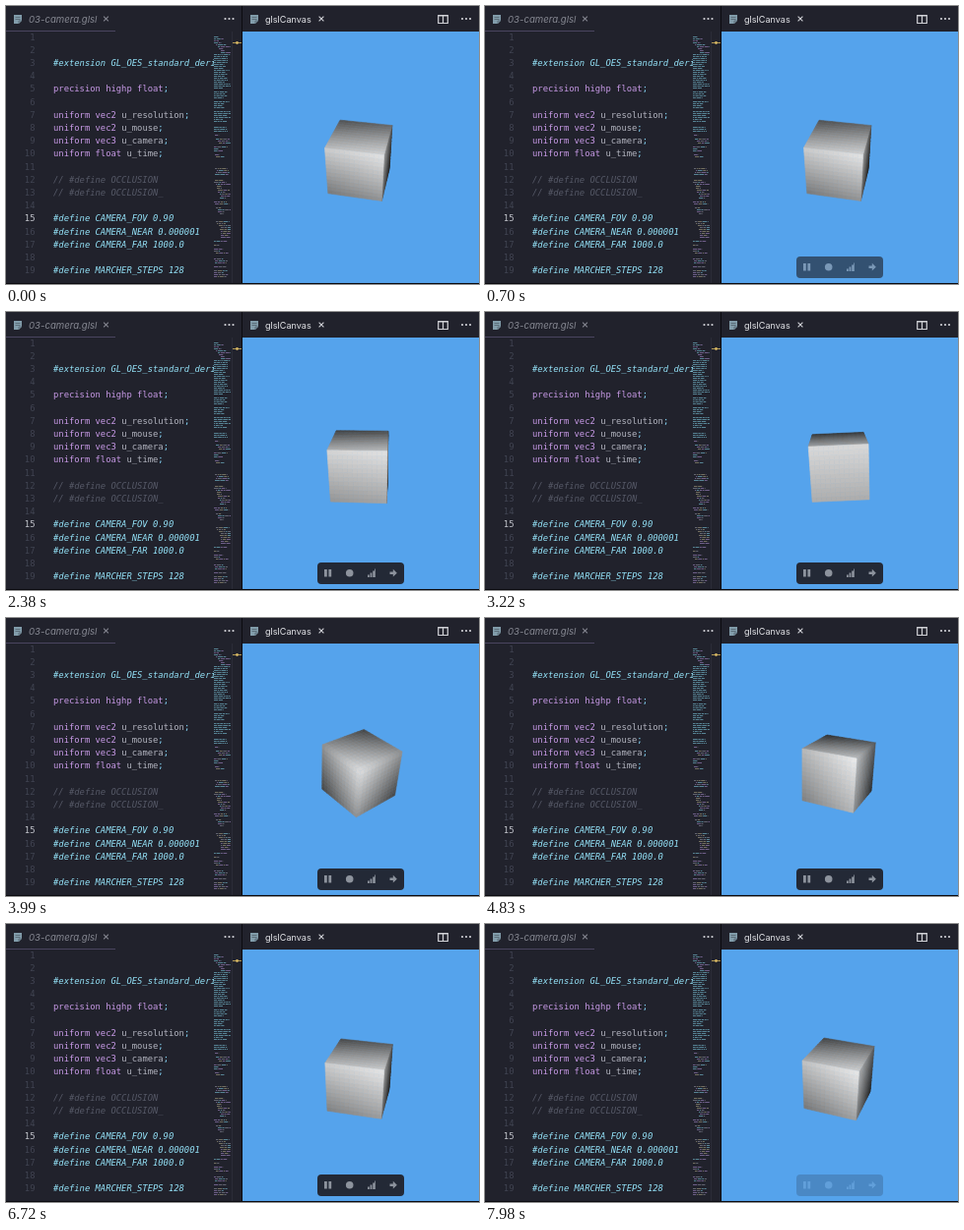
An HTML page with a canvas that plays this animation: 480 by 283 pixels, repeating every 8.05 s.

```html
<!DOCTYPE html>
<html lang="en">
<head>
<meta charset="utf-8">
<title>Shader preview</title>
<style>
html, body { margin: 0; width: 100%; height: 100%; overflow: hidden; background: #21222c; }
svg, canvas { position: absolute; left: 0; top: 0; }
text { white-space: pre; }
.tab { font-family: Inter, sans-serif; font-style: normal; }
#code text { font: 8.83px "DejaVu Sans Mono", monospace; fill: #b4b6c1; }
#code .macro { fill: #94e2f8; font-style: italic; }
#code .note { fill: #565967; font-style: italic; }
#code .key { fill: #c99be8; }
#code .end { fill: #89ddff; }
#code .num { fill: #414452; text-anchor: end; }
#code .now { fill: #c3c5cc; }
</style>
</head>
<body>
<svg width="480" height="283" viewBox="0 0 480 283">
  <defs>
    <clipPath id="pane"><path d="M0 26H211V282H0z"/></clipPath>
    <g id="file">
      <path d="M0 0H8V6L5 9H0z" fill="#829dab"/>
      <path d="M1.5 2.5H6.5M1.5 4.5H6.5M5 9V6H8" stroke="#53646f" stroke-width=".8" fill="none"/>
    </g>
    <path id="close" d="M-2.4 -2.4L2.4 2.4M2.4 -2.4L-2.4 2.4" stroke-width="1.1"/>
    <g id="more" fill="#d2d3d8"><circle cx="-4" r="1.1"/><circle r="1.1"/><circle cx="4" r="1.1"/></g>
  </defs>
  <rect width="480" height="283" fill="#21222c"/>
  <path d="M0 25.5H111" stroke="#4a4560"/>
  <use href="#file" x="8" y="9"/>
  <text class="tab" x="23" y="16.6" font-size="9.6" style="font-style:italic" fill="#868892">03-camera.glsl</text>
  <use href="#close" x="101.5" y="13" stroke="#83858f"/>
  <use href="#more" x="226.5" y="13"/>
  <use href="#file" x="248" y="9"/>
  <text class="tab" x="263" y="16.6" font-size="9.1" fill="#e4e5e9">glslCanvas</text>
  <use href="#close" x="320" y="13" stroke="#d2d3d8"/>
  <path d="M438.7 9.5H448.3V17.5H438.7zM443.5 9V18M438.5 10H448.5" fill="none" stroke="#d2d3d8" stroke-width="1.2"/>
  <use href="#more" x="467" y="13"/>
  <g id="code" clip-path="url(#pane)"></g>
  <path d="M229.5 26V282" stroke="#2b2c38"/>
  <path d="M230 37.5H239" stroke="#b39a55"/>
  <circle cx="234.5" cy="37.5" r="1.4" fill="#d6b763"/>
  <path d="M239.5 0V283M0 282.5H480" stroke="#0b0b10"/>
  <rect x="240" y="26" width="240" height="256" fill="#55a3ec"/>
  <g id="controls" opacity="0">
    <rect x="316" y="255" width="88" height="22" rx="4" fill="#232936"/>
    <g fill="#8d939d">
      <path d="M323 262h2.8v7.5H323zM327.4 262h2.8v7.5h-2.8z"/>
      <circle cx="348.7" cy="265.7" r="3.8"/>
      <path d="M367 267.5h1.8v2.5H367zM369.6 265.5h1.8v4.5h-1.8zM372.2 263.5h1.8v6.5h-1.8zM374.2 261.5h.8v8.5h-.8z"/>
      <path d="M389.5 264.4h3.3v-2.6l4 3.9-4 3.9V267h-3.3z"/>
    </g>
  </g>
</svg>
<canvas id="stage" width="480" height="283"></canvas>
<script>
const LOOP = 8050;
const ctx = document.getElementById("stage").getContext("2d");
const controls = document.getElementById("controls");
const clamp = (v, lo = 0, hi = 1) => Math.min(hi, Math.max(lo, v));

// Editor text
const lines = ["", "", "#extension GL_OES_standard_derivatives", "", "precision highp float;", "",
  "uniform vec2 u_resolution;", "uniform vec2 u_mouse;", "uniform vec3 u_camera;", "uniform float u_time;", "",
  "// #define OCCLUSION", "// #define OCCLUSION_", "",
  "#define CAMERA_FOV 0.90", "#define CAMERA_NEAR 0.000001", "#define CAMERA_FAR 1000.0", "",
  "#define MARCHER_STEPS 128"];

function markup(line) {
  const span = (cls, s) => `<tspan class="${cls}">${s}</tspan>`;
  if (line[0] === "#") return span("macro", line);
  if (line[0] === "/") return span("note", line);
  return line.replace(/\b(precision|highp|float|uniform|vec\d)\b|;/g, s => span(s === ";" ? "end" : "key", s));
}
document.getElementById("code").innerHTML = lines.map((line, i) => {
  const y = 34.7 + 13.19 * i;
  return `<text class="num${i === 14 ? " now" : ""}" x="29.5" y="${y}">${i + 1}</text>` +
    `<text x="48" y="${y}">${markup(line)}</text>`;
}).join("");

// Minimap: dense macro block on top, indented code below
function drawMinimap() {
  let seed = 11;
  const rand = () => (seed = seed * 16807 % 2147483647) / 2147483647;
  const hues = ["#6aa6b8", "#8a74a8", "#787b88", "#8f8a72"];
  ctx.globalAlpha = .75;
  let indent = 0;
  for (let y = 29; y < 281; y += 2) {
    const dense = y > 48 && y < 130;
    if (rand() < (dense ? .12 : .2)) { indent = 0; continue; }
    if (!dense) indent = clamp(indent + Math.round(rand() * 4 - 1.6), 0, 7);
    let x = 211 + (dense ? 0 : indent);
    const end = Math.min(228, x + (dense ? 9 + rand() * 9 : 4 + rand() * 12));
    while (x < end) {
      const w = 1 + rand() * 4;
      ctx.fillStyle = dense ? hues[0] : y < 48 ? hues[rand() < .5 ? 0 : 1] : hues[Math.floor(rand() * 4)];
      ctx.fillRect(x, y, Math.min(w, end - x), 1);
      x += w + .7;
    }
  }
  ctx.globalAlpha = 1;
}

// Camera: time, yaw, pitch, roll (degrees)
const poses = [
  [0, 12, 35, 0], [1470, 12, 34, 0], [3220, 0, 17, -2.5], [3990, 45, 35, 5],
  [5670, 0, 9, 0], [6720, 12, 31, 1], [7980, 18.5, 31, 1.5], [LOOP, 18.5, 31, 1.5]
];
function poseAt(t) {
  const i = poses.findIndex(p => p[0] > t);
  const a = poses[i - 1], b = poses[i];
  const u = (t - a[0]) / (b[0] - a[0]), k = u * u * (3 - 2 * u);
  return [1, 2, 3].map(j => (a[j] + (b[j] - a[j]) * k) * Math.PI / 180);
}

const DIST = 6.2, FOCAL = 340, CELLS = 12;
function drawCube([yaw, pitch, roll]) {
  const turn = ([x, y, z]) => {
    const x1 = x * Math.cos(yaw) - z * Math.sin(yaw);
    const z1 = x * Math.sin(yaw) + z * Math.cos(yaw);
    return [x1, y * Math.cos(pitch) - z1 * Math.sin(pitch), y * Math.sin(pitch) + z1 * Math.cos(pitch)];
  };
  const project = ([x, y, z]) => {
    const s = FOCAL / (DIST - z), c = Math.cos(roll), n = Math.sin(roll);
    return [359.5 + s * (x * c + y * n), 156 + s * (x * n - y * c)];
  };
  for (let axis = 0; axis < 3; axis++) for (const side of [-1, 1]) {
    const point = (u, v) => {
      const p = [0, 0, 0];
      p[axis] = side / 2;
      p[(axis + 1) % 3] = u / CELLS - .5;
      p[(axis + 2) % 3] = v / CELLS - .5;
      return turn(p);
    };
    const normal = [0, 0, 0];
    normal[axis] = side;
    const facing = turn(normal)[2];
    if (facing * DIST <= .5) continue;
    for (let u = 0; u < CELLS; u++) for (let v = 0; v < CELLS; v++) {
      const depth = point(u + .5, v + .5)[2];
      const g = Math.round(clamp((123 + 154 * depth) * facing ** .27, 40, 238));
      ctx.fillStyle = ctx.strokeStyle = `rgb(${g},${g},${g})`;
      ctx.beginPath();
      for (const [i, j] of [[0, 0], [1, 0], [1, 1], [0, 1]]) ctx.lineTo(...project(point(u + i, v + j)));
      ctx.closePath();
      ctx.fill();
      ctx.stroke();
    }
  }
}

function frame(now) {
  const t = now % LOOP;
  ctx.clearRect(240, 26, 240, 256);
  drawCube(poseAt(t));
  controls.setAttribute("opacity", Math.min(clamp((t - 500) / 300), clamp((8050 - t) / 320)));
  requestAnimationFrame(frame);
}

ctx.lineWidth = .6;
ctx.lineJoin = "round";
drawMinimap();
requestAnimationFrame(frame);
</script>
</body>
</html>
```
